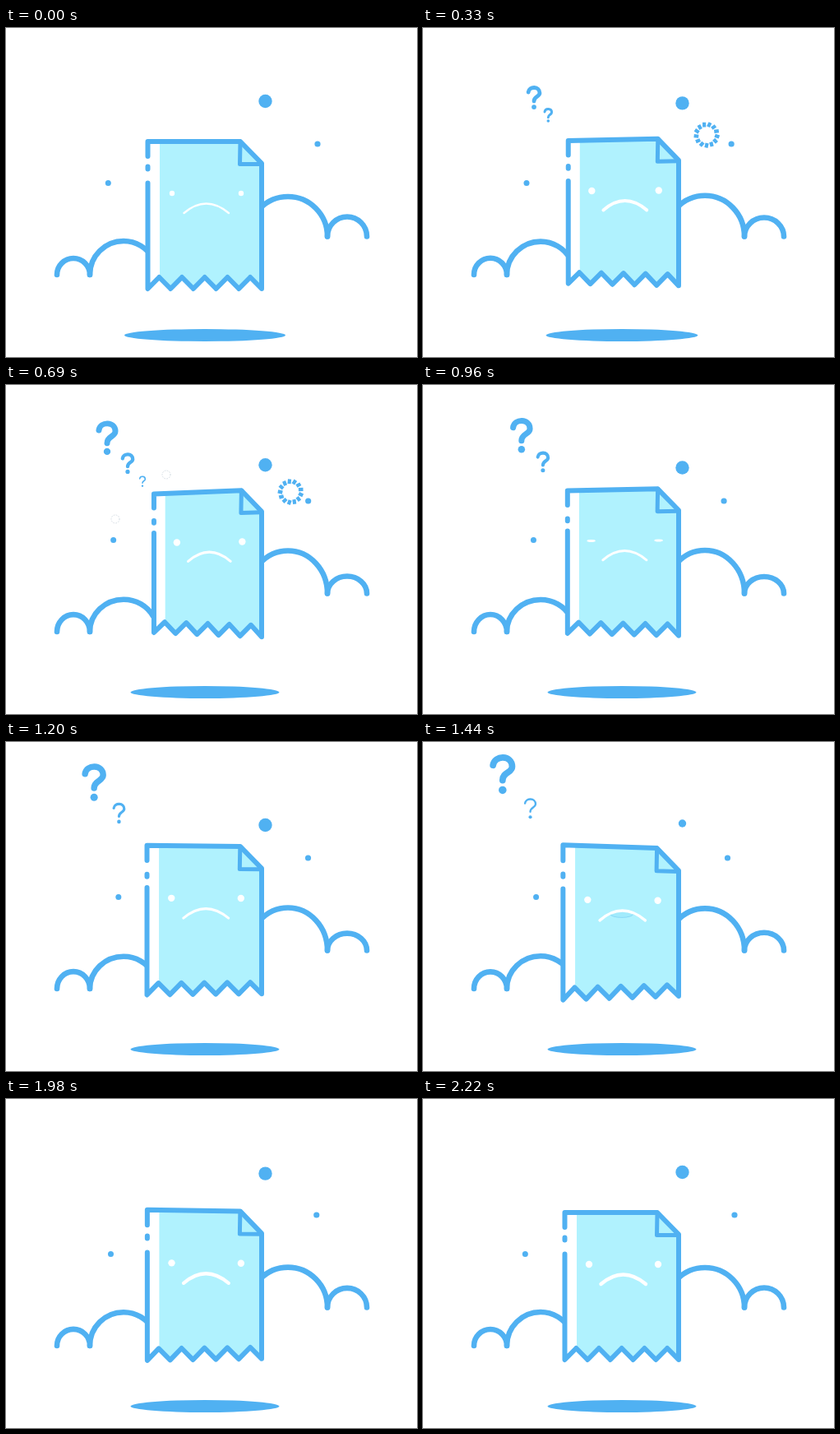
Animation of 500x400 px, one loop 2250 ms. Source, as an HTML page with a canvas:

```html
<!DOCTYPE html>
<html lang="en">
<head>
<meta charset="utf-8">
<title>Puzzled page</title>
<style>
  html, body { margin: 0; width: 100%; height: 100%; overflow: hidden; background: #fff; }
  canvas { display: block; width: 500px; height: 400px; }
</style>
</head>
<body>
<canvas id="stage" width="500" height="400"></canvas>
<script>
const ctx = document.getElementById('stage').getContext('2d');
const LOOP = 2250, STEP = 30;
const BLUE = '#50b1f2', CYAN = '#b0f2fe';

const span = (t, a, b) => Math.min(1, Math.max(0, (t - a) / (b - a)));
const ease = (t, a, b) => (1 - Math.cos(Math.PI * span(t, a, b))) / 2;
// Rises from 0 at a to 1 at b, holds until c, returns to 0 at d.
const swell = (t, a, b, c, d) => ease(t, a, b) - ease(t, c, d);
const bump = (t, a, peak, d) => swell(t, a, peak, peak, d);

function stroke(width, color = BLUE) {
  ctx.lineWidth = width;
  ctx.strokeStyle = color;
  ctx.stroke();
}

function oval(x, y, rx, ry = rx, color = BLUE) {
  ctx.beginPath();
  ctx.ellipse(x, y, rx, ry, 0, 0, 7);
  ctx.fillStyle = color;
  ctx.fill();
}

function hump(x, y, rx, ry, cut = 0) {
  ctx.beginPath();
  ctx.ellipse(x, y, rx, ry, 0, Math.PI, 2 * Math.PI - cut);
  stroke(6.6);
}

function clouds(lift) {
  hump(82, 300, 20, 20 + lift);
  hump(143, 300, 41, 41 - 2 * lift, 0.5);
  hump(343, 253.5, 48, 48.5 + 4 * lift);
  hump(415, 253.5, 24, 24 - 3.5 * lift);
}

const HOOK = new Path2D('M-10.5-9.5C-9-21 10.5-21 10.5-8C10.5-1 0-2 0 7');

function question(x, y, height, width) {
  if (height < 1) return;
  ctx.save();
  ctx.translate(x, y);
  ctx.scale(height / 44, height / 44);
  ctx.lineWidth = width;
  ctx.strokeStyle = BLUE;
  ctx.stroke(HOOK);
  oval(0, 17.7, width * 0.3 + 2.2);
  ctx.restore();
}

// Pops out of the page, drifts up and to the left, then is pulled back in.
function mark(t, x, y, height, dx, dy, dh, thinning) {
  const X = 162, Y = 130;
  const out = 1 - (1 - span(t, 150, 540)) ** 1.9;
  const drift = ease(t, 800, 1520);
  const back = span(t, 1560, 1815);
  const size = out * (1 - back);
  question(
    X + (x + dx * drift - X) * size,
    Y + (y + dy * drift - Y) * size,
    (height + dh * drift) * size,
    7.3 - thinning * drift * (1 - back));
}

function questions(t) {
  mark(t, 123, 64, 42, -27, -26, 7, 0.3);
  mark(t, 148, 95, 26, -18, -15, 1, 3.5);
  question(166, 117, 14 * bump(t, 520, 690, 860), 5);
}

function burst(t) {
  const size = swell(t, 120, 300, 730, 880), count = 13;
  if (!size) return;
  ctx.save();
  ctx.translate(344 + t / 300, 130);
  ctx.rotate(t / 600);
  ctx.scale(size, size);
  ctx.lineCap = 'butt';
  ctx.beginPath();
  for (let i = 0; i < count; i++) {
    const a = i / count * 2 * Math.PI;
    ctx.moveTo(10 * Math.cos(a), 10 * Math.sin(a));
    ctx.lineTo(15.5 * Math.cos(a + 0.1), 15.5 * Math.sin(a + 0.1));
  }
  stroke(4.2);
  ctx.restore();
}

function bubbles(t) {
  ctx.save();
  ctx.globalAlpha = 0.7 * bump(t, 580, 690, 800);
  ctx.setLineDash([1, 2]);
  for (const [x, y] of [[195, 109], [133, 163]]) {
    ctx.beginPath();
    ctx.arc(x, y, 5, 0, 7);
    stroke(0.8, '#b9c6d0');
  }
  ctx.restore();
}

// The page hangs on its right edge while the left edge swings in perspective.
function page(t, lift) {
  const LEFT = 172.5, RIGHT = 311, TOP = 138, BOTTOM = 317, MIDDLE = 227.5, TEETH = 10;
  const width = RIGHT - LEFT;
  const shift = 7.7 * bump(t, 0, 620, 1250) - 2.2 * bump(t, 900, 1500, LOOP);
  const swing = 0.06 * (ease(t, 650, 1600) - bump(t, 0, 650, 1600) - ease(t, 1600, LOOP));
  const map = (x, y) => {
    const u = (RIGHT - x) / width;
    return [RIGHT - u * (width - shift), MIDDLE + (y - MIDDLE) * (1 + u * swing) - 12.3 * lift];
  };
  const trace = pts => pts.forEach((p, i) => ctx[i ? 'lineTo' : 'moveTo'](...map(...p)));
  const shape = pts => { ctx.beginPath(); trace(pts); };
  const fill = (pts, color) => { shape(pts); ctx.fillStyle = color; ctx.fill(); };

  const teeth = Array.from({ length: TEETH + 1 },
    (_, i) => [RIGHT - i * width / TEETH, i % 2 ? BOTTOM - 14 : BOTTOM]);
  const slope = [[285, TOP], [RIGHT, 164.5]];

  fill([[LEFT, TOP], ...slope, ...teeth], '#fff');
  fill([[187, TOP], ...slope, ...teeth.slice(0, TEETH), [187, 304]], CYAN);

  const dash = 170 + 4.5 * lift;
  shape([[LEFT, TOP], ...slope, ...teeth, [LEFT, 188.5]]);
  trace([[LEFT, dash + 1.5], [LEFT, dash - 1.5]]);
  trace([[LEFT, 156], [LEFT, TOP]]);
  stroke(6);
  shape([[285, TOP], [284.5, 165.5], [RIGHT, 165.5]]);
  stroke(5);

  const wake = ease(t, 0, 330);
  const blink = bump(t, 860, 960, 1060);
  const r = 3.2 + wake;
  for (const x of [202, 286]) {
    oval(...map(x, 201), r + blink, r * (1 - 0.65 * blink), '#fff');
  }

  ctx.save();
  ctx.globalAlpha = swell(t, 1220, 1380, 1800, 1980);
  oval(...map(243, 217.5), 14, 4.2, '#a2ebfc');
  stroke(0.8, '#83d3f5');
  ctx.restore();

  ctx.beginPath();
  ctx.moveTo(...map(216.5, 225));
  ctx.quadraticCurveTo(...map(243.5, 202), ...map(271, 225));
  stroke(2.4 + 2 * wake - 1.5 * lift, '#fff');
}

function draw(t) {
  const lift = bump(t, 0, 900, LOOP);
  ctx.clearRect(0, 0, 500, 400);
  ctx.lineCap = ctx.lineJoin = 'round';

  clouds(lift);
  oval(242, 373.5, 98 - 7.5 * ease(t, 0, 500), 7.5);
  oval(315.5, 89 + 12.2 * bump(t, 0, LOOP / 2, LOOP), 8.2 - 3.5 * bump(t, 1200, 1440, 1660));
  oval(379 - 13 * lift, 141, 3.6);
  oval(124.3 + 13.3 * bump(t, 0, 1420, LOOP), 188.5, 3.5);

  page(t, lift);
  burst(t);
  bubbles(t);
  questions(t);
}

function tick() {
  const t = performance.now() % LOOP;
  draw(Math.floor(t / STEP) * STEP);
  requestAnimationFrame(tick);
}
tick();
</script>
</body>
</html>
```
